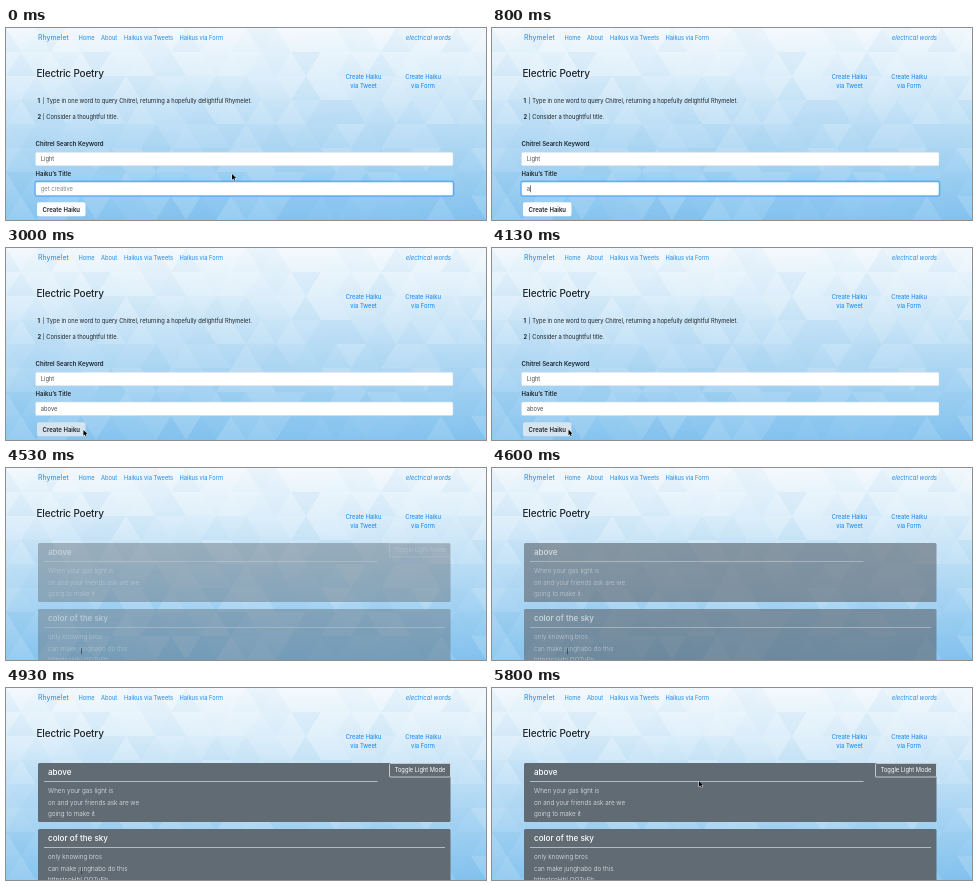
These frames come from a looping animation (480x192 px, 7070 ms). An HTML page with a canvas:

```html
<!DOCTYPE html>
<html lang="en">
<head>
<meta charset="utf-8">
<title>Electric Poetry</title>
<style>
html, body { margin: 0; width: 100%; height: 100%; overflow: hidden; background: #b9dcf5; }
canvas { display: block; }
</style>
</head>
<body>
<canvas id="stage"></canvas>
<script>
const W = 480, H = 192, LOOP = 7070;
const canvas = document.getElementById('stage');
const ctx = canvas.getContext('2d');
const dpr = window.devicePixelRatio || 1;
canvas.width = W * dpr;
canvas.height = H * dpr;
canvas.style.width = W + 'px';
canvas.style.height = H + 'px';

const FAMILY = 'Inter, "Open Sans", sans-serif';
const LINK = '#218be6', INK = '#1d2329';

// Timeline in ms
const TYPED = [[130, 'a'], [1070, 'ab'], [1400, 'abo'], [1670, 'abov'], [1930, 'above']];
const HIDE_MOUSE = 130, SHOW_MOUSE = 2200, HOVER = 2800, CLICK = 3000;
const LEAVE = 4200, FADE = 4370, FADE_LENGTH = 360, TOGGLE = 4870;
const MOUSE = [
  [2200, 161, 185], [2330, 160, 186], [2470, 154, 185], [2800, 82, 182],
  [3070, 76.5, 182], [5330, 76.5, 181], [5800, 207, 93]
];

const clamp = v => Math.max(0, Math.min(1, v));
const smooth = v => v * v * (3 - 2 * v);

function text(str, x, y, size, color, { weight = 400, align = 'left', style = 'normal', track = 0 } = {}) {
  ctx.font = `${style} ${weight} ${size}px ${FAMILY}`;
  ctx.letterSpacing = track + 'px';
  ctx.textAlign = align;
  ctx.fillStyle = color;
  ctx.fillText(str, x, y);
  return ctx.measureText(str).width;
}

function box(x, y, w, h, r, fill, stroke, line = 0.5) {
  ctx.beginPath();
  ctx.roundRect(x, y, w, h, r);
  if (fill) { ctx.fillStyle = fill; ctx.fill(); }
  if (stroke) { ctx.strokeStyle = stroke; ctx.lineWidth = line; ctx.stroke(); }
}

function makeBackdrop() {
  const layer = document.createElement('canvas');
  layer.width = W * dpr;
  layer.height = H * dpr;
  const g = layer.getContext('2d');
  g.scale(dpr, dpr);
  const sky = g.createLinearGradient(0, 0, 0, H);
  sky.addColorStop(0, '#f4f9fd');
  sky.addColorStop(0.25, '#dceefa');
  sky.addColorStop(0.55, '#b8dcf5');
  sky.addColorStop(1, '#86c4ef');
  g.fillStyle = sky;
  g.fillRect(0, 0, W, H);

  let seed = 11;
  const random = () => (seed = (seed * 16807) % 2147483647) / 2147483647;
  const half = 15, tall = 24;
  for (let row = 0; row * tall < H; row++) {
    for (let col = -1; col * half < W; col++) {
      const x = col * half, y = row * tall;
      const up = (row + col) & 1;
      const tone = random() - 0.5;
      g.fillStyle = tone > 0 ? `rgba(255,255,255,${tone * 0.3})` : `rgba(80,165,220,${-tone * 0.14})`;
      g.beginPath();
      g.moveTo(x, up ? y + tall : y);
      g.lineTo(x + 2 * half, up ? y + tall : y);
      g.lineTo(x + half, up ? y : y + tall);
      g.fill();
    }
  }
  return layer;
}
const backdrop = makeBackdrop();

function drawHeader() {
  text('Rhymelet', 32, 12.2, 7, LINK);
  text('Home', 72.5, 11.8, 5.75, LINK);
  text('About', 95, 11.8, 5.75, LINK);
  text('Haikus via Tweets', 118, 11.8, 5.75, LINK);
  text('Haikus via Form', 173.5, 11.8, 5.75, LINK);
  text('electrical words', 445, 11.8, 6, LINK, { align: 'right', style: 'italic' });
  text('Electric Poetry', 30.5, 49, 10, INK, { weight: 500, track: -0.18 });
  [[357.5, 'via Tweet'], [417, 'via Form']].forEach(([x, kind]) => {
    text('Create Haiku', x, 51, 5.85, '#0d82f0', { align: 'center' });
    text(kind, x, 60.3, 5.85, '#0d82f0', { align: 'center' });
  });
}

function drawField(y, focused) {
  if (focused) box(29, y - 0.7, 418.6, 14.8, 2, null, 'rgba(0,110,245,.35)', 1.4);
  box(29.5, y, 417.5, 13.5, 1.5, '#fff', focused ? '#5ba7f5' : '#cbd9e4');
}

function drawForm(t) {
  const step = (n, str, y) => {
    text(n, 31.5, y, 5.75, INK, { weight: 700 });
    text('| ' + str, 36.8, y, 5.75, INK);
  };
  step('1', 'Type in one word to query Chitrel, returning a hopefully delightful Rhymelet.', 75.3);
  step('2', 'Consider a thoughtful title.', 90.6);

  text('Chitrel Search Keyword', 29.5, 118.2, 6, INK, { weight: 600 });
  drawField(124.2, false);
  text('Light', 34.8, 133.2, 5.75, '#495057');

  text('Haiku\u2019s Title', 29.5, 148, 6, INK, { weight: 600 });
  const focused = t < CLICK;
  drawField(154, focused);
  const typed = TYPED.filter(([at]) => t >= at).map(([, str]) => str).pop();
  const width = text(typed || 'get creative', 34.8, 163, 5.75, typed ? '#495057' : '#7b848c');
  if (focused && typed) {
    ctx.fillStyle = '#222';
    ctx.fillRect(35.1 + width, 157.3, 0.6, 7);
  }

  box(31, 174.3, 48.5, 14, 1.8, t >= HOVER ? '#d5e4ef' : '#fbfcfd');
  text('Create Haiku', 55.3, 183.6, 6, INK, { weight: 600, align: 'center' });
}

function drawCard(y, height, lineEnd, title, lines) {
  box(32, y, 412.5, height, 1.5, '#616b74');
  text(title, 42, y + 12.4, 8.1, '#fff', { weight: 500 });
  ctx.fillStyle = '#d9dee2';
  ctx.fillRect(38, y + 18.2, lineEnd - 38, 0.7);
  lines.forEach((str, i) => text(str, 42, y + 30.3 + i * 11.4, 6.35, '#e4e8eb', { weight: 300 }));
}

function drawToggle(alpha) {
  ctx.globalAlpha = alpha;
  box(383.5, 75.5, 61, 13.5, 1, null, '#eef1f3', 0.7);
  text('Toggle Light Mode', 414, 84.3, 5.75, '#fff', { align: 'center' });
}

function drawCards(t) {
  const alpha = clamp((t - FADE) / FADE_LENGTH);
  if (!alpha) return;
  ctx.globalAlpha = alpha;
  drawCard(75, 59, 371.5, 'above',
    ['When your gas light is', 'on and your friends ask are we', 'going to make it']);
  drawCard(141, 60, 439, 'color of the sky',
    ['only knowing bros', 'can make junghabo do this', 'httpstcoHbLOQ7vEb']);
  if (t >= TOGGLE) drawToggle(1);
  else if (t < 4600) drawToggle(0.2);
  ctx.globalAlpha = 1;
}

function mouseAt(t) {
  if (t < HIDE_MOUSE) return [226, 146];
  const next = MOUSE.findIndex(([at]) => at > t);
  if (next < 0) return MOUSE[MOUSE.length - 1].slice(1);
  const [t0, x0, y0] = MOUSE[next - 1], [t1, x1, y1] = MOUSE[next];
  const k = smooth((t - t0) / (t1 - t0));
  return [x0 + (x1 - x0) * k, y0 + (y1 - y0) * k];
}

function drawMouse(t) {
  if (t >= HIDE_MOUSE && t < SHOW_MOUSE) return;
  const [x, y] = mouseAt(t);
  ctx.save();
  ctx.translate(x, y);
  ctx.beginPath();
  if (t >= FADE && t < 5330) {
    // Text cursor while resting over a poem line
    ctx.rect(-1.2, -1, 0.7, 6);
    ctx.fillStyle = '#30363b';
    ctx.fill();
  } else {
    [[0, 0], [0, 5.8], [1.4, 4.6], [2.3, 6.6], [3.2, 6.2], [2.3, 4.2], [4.1, 4.1]]
      .forEach(p => ctx.lineTo(...p));
    ctx.closePath();
    ctx.lineJoin = 'round';
    ctx.strokeStyle = '#fff';
    ctx.lineWidth = 0.9;
    ctx.stroke();
    ctx.fillStyle = '#000';
    ctx.fill();
  }
  ctx.restore();
}

function frame(now) {
  const t = now % LOOP;
  ctx.setTransform(1, 0, 0, 1, 0, 0);
  ctx.drawImage(backdrop, 0, 0);
  ctx.scale(dpr, dpr);
  drawHeader();
  if (t < LEAVE) drawForm(t);
  else drawCards(t);
  drawMouse(t);
  requestAnimationFrame(frame);
}
const start = performance.now();
requestAnimationFrame(() => frame(0));
</script>
</body>
</html>
```
